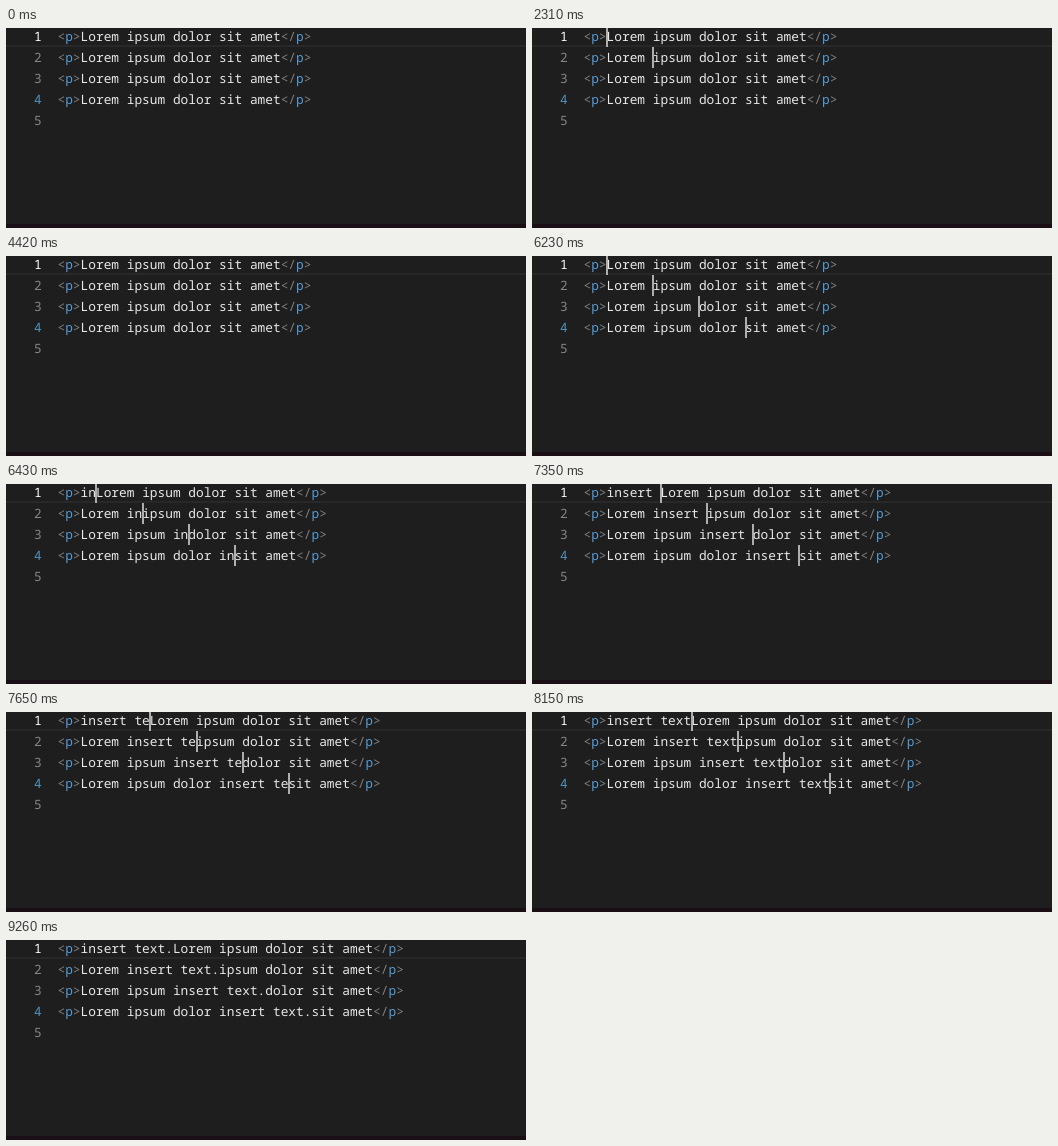
Recreate the animation shown at these times as an HTML page. Size 520 by 200 pixels, loop 9.66 s.

```html
<!DOCTYPE html>
<html lang="en">
<head>
<meta charset="utf-8">
<title>Multi-cursor editing</title>
<style>
  html, body { margin: 0; width: 100%; height: 100%; overflow: hidden; background: #1e1e1e; }
  svg { display: block; }
  text {
    font: 12.83px "Noto Sans Mono", "DejaVu Sans Mono", monospace;
    text-rendering: geometricPrecision;
    white-space: pre;
    fill: #e8e8e8;
  }
  .number { text-anchor: end; fill: #858585; }
  .number.current { fill: #fff; }
  .number.changed { fill: #5590b8; }
  .bracket { fill: #808080; }
  .tag { fill: #569cd6; }
  .caret { fill: #aeafad; }
</style>
</head>
<body>
<svg id="stage" width="520" height="200" viewBox="0 0 520 200">
  <rect width="520" height="200" fill="#1e1e1e"/>
  <rect y="17" width="520" height="2" fill="#282828"/>
  <rect y="196" width="520" height="4" fill="#190f14"/>
</svg>
<script>
const LOOP = 9660;
const CHAR = 7.698, LEFT = 51.45, LINE = 21, TOP = -2, BASELINE = 15;
const WORDS = ["Lorem ", "ipsum ", "dolor ", "sit amet"];
const INSERT = "insert text.";

// Moment at which each character of INSERT appears
const TYPED_AT = [6330, 6430, 6630, 6850, 7050, 7150, 7350, 7550, 7650, 7950, 8150, 8760];

// [time, number of visible carets]
const CARETS = [
  [0, 0], [2310, 2], [2810, 0], [3220, 2], [3720, 0], [3920, 3], [4420, 0],
  [4930, 3], [5230, 4], [5730, 0], [6230, 4], [8660, 0], [8760, 4], [9260, 0]
];

const stage = document.getElementById("stage");

function add(parent, name, attributes, content = "") {
  const node = document.createElementNS("http://www.w3.org/2000/svg", name);
  for (const key in attributes) node.setAttribute(key, attributes[key]);
  node.textContent = content;
  return parent.appendChild(node);
}

function addNumber(index) {
  const state = { 0: " current", 3: " changed" }[index] || "";
  add(stage, "text", { class: "number" + state, x: 35.6, y: TOP + BASELINE + index * LINE }, index + 1);
}

function addRow(index) {
  const y = TOP + index * LINE;
  const text = add(stage, "text", { x: LEFT, y: y + BASELINE });
  const span = (content, kind = "") => add(text, "tspan", { class: kind }, content);
  const before = WORDS.slice(0, index).join("");

  span("<", "bracket");
  span("p", "tag");
  span(">", "bracket");
  span(before);
  const inserted = span("");
  span(WORDS.slice(index).join(""));
  span("</", "bracket");
  span("p", "tag");
  span(">", "bracket");

  const caret = add(stage, "rect", { class: "caret", y, width: 2, height: LINE });
  return { inserted, caret, column: 3 + before.length };
}

for (let i = 0; i < 5; i++) addNumber(i);
const rows = WORDS.map((_, i) => addRow(i));

function draw() {
  const time = performance.now() % LOOP;
  const typed = TYPED_AT.filter(t => t <= time).length;
  const visible = CARETS.filter(([t]) => t <= time).pop()[1];

  rows.forEach(({ inserted, caret, column }, i) => {
    inserted.textContent = INSERT.slice(0, typed);
    caret.setAttribute("x", Math.floor(LEFT + (column + typed) * CHAR));
    caret.setAttribute("visibility", i < visible ? "visible" : "hidden");
  });
  requestAnimationFrame(draw);
}
draw();
</script>
</body>
</html>
```
